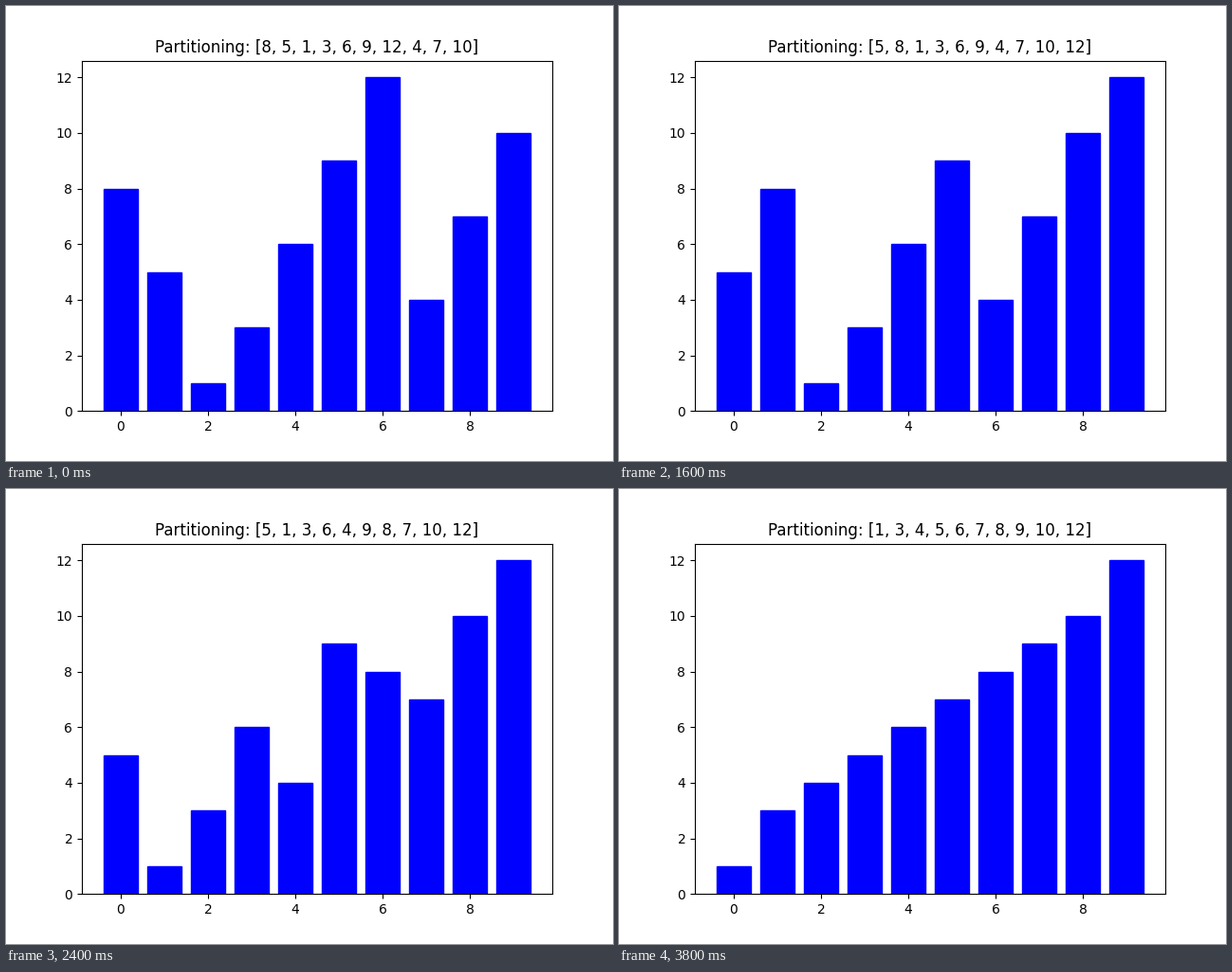
A matplotlib script for the animation above (4.4 s loop, 640 by 480 pixels).

```python
import matplotlib.pyplot as plt
from matplotlib.animation import FuncAnimation

STEP_MS = 200
START = [8, 5, 1, 3, 6, 9, 12, 4, 7, 10]


def quicksort(values, low, high):
    """Sort in place, last item as pivot, yielding a copy after each swap."""
    if low >= high:
        return
    pivot = values[high]
    store = low
    for j in range(low, high + 1):
        if values[j] <= pivot:
            values[store], values[j] = values[j], values[store]
            yield list(values)
            store += 1
    yield from quicksort(values, low, store - 2)
    yield from quicksort(values, store, high)


# The opening swap leaves the list as it is and is not shown.
states = list(quicksort(list(START), 0, len(START) - 1))[1:]

plt.rcParams["font.family"] = "DejaVu Sans"
fig, ax = plt.subplots(figsize=(6.4, 4.8), dpi=100)
bars = ax.bar(range(len(START)), START, color="blue", edgecolor="blue", linewidth=1)
title = ax.set_title("")


def update(step):
    values = states[step]
    for bar, value in zip(bars, values):
        bar.set_height(value)
    title.set_text(f"Partitioning: {values}")
    return [*bars, title]


anim = FuncAnimation(fig, update, frames=len(states), interval=STEP_MS,
                     repeat=True, repeat_delay=0, blit=False)
plt.show()
```
